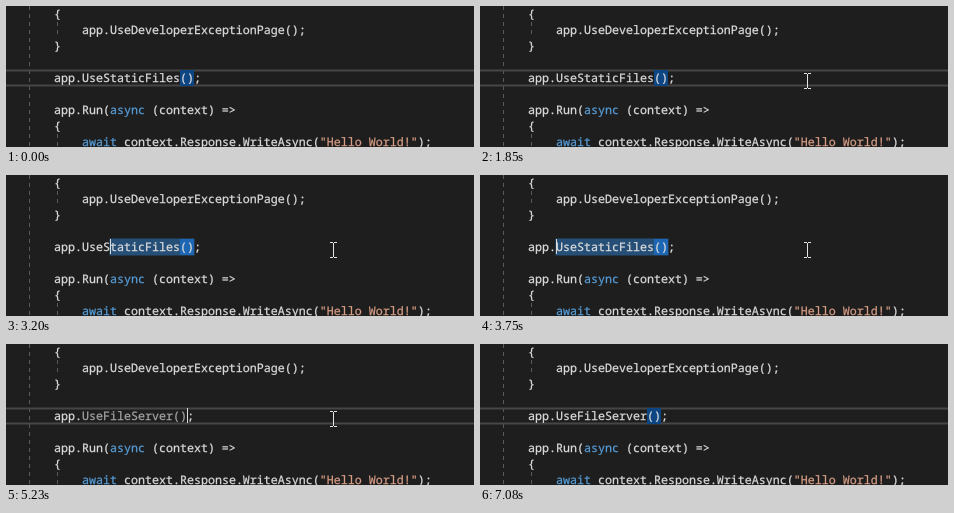
An HTML page that plays this animation: 468 px wide and 141 px high, repeating every 7.16 s.

```html
<!DOCTYPE html>
<html lang="en">
<head>
<meta charset="utf-8">
<title>Editor</title>
<style>
  html, body { margin: 0; width: 100%; height: 100%; overflow: hidden; background: #1e1e1e; }
  svg { display: block; width: 468px; height: 141px; }
  text {
    font: 11.6667px "Noto Sans Mono", "DejaVu Sans Mono", monospace;
    color: #dcdcdc; white-space: pre; text-rendering: geometricPrecision;
  }
  text, tspan { fill: currentColor; stroke: currentColor; stroke-width: .25px; }
  .keyword { color: #569cd6; }
  .string { color: #d69d85; }
  .guide { stroke: #5a5a5a; stroke-dasharray: 4 4; }
  .mark { fill: #0e4583; }
  #line { fill: #464646; }
  #selection { fill: #39f; stroke: #39f; opacity: .4; }
  #caret { fill: #dcdcdc; }
  #mouse { fill: none; stroke: #e4e4e4; }
</style>
</head>
<body>
<svg viewBox="0 0 468 141">
  <path class="guide" d="M23.5 0V141M51.5 16V32M51.5 128V141"/>
  <path id="line" d="M0 63.5h468v2H0zM0 78.5h468v2H0z"/>
  <rect id="braces" class="mark" y="64" width="14" height="16"/>
  <rect id="reference" class="mark" x="75.5" y="63.5" width="99" height="17"/>
  <rect id="selection" y="64" height="16"/>

  <text x="48" y="12">{</text>
  <text x="76" y="28">app.UseDeveloperExceptionPage();</text>
  <text x="48" y="44">}</text>
  <text x="48" y="76">app.<tspan id="call"></tspan>;</text>
  <text x="48" y="108">app.Run(<tspan class="keyword">async</tspan> (context) =&gt;</text>
  <text x="48" y="124">{</text>
  <text x="76" y="140"><tspan class="keyword">await</tspan> context.Response.WriteAsync(<tspan class="string">"Hello World!"</tspan>);</text>

  <rect id="caret" y="64" width="1" height="15"/>
  <path id="mouse" d="M-3 -7.5H0M1 -7.5H4M.5 -7V7M-3 7.5H0M1 7.5H4"/>
</svg>
<script>
const LOOP = 7160, CHAR = 7, CALL_X = 76, CALL_END = 188;
const el = id => document.getElementById(id);
const show = (id, on) => el(id).setAttribute("visibility", on ? "visible" : "hidden");
const within = (t, from, to) => t >= from && t < to;

// Moments at which the selection grows by one character to the left.
const growTimes = [2020, 2090, 2260, 2330, 2500, 2580, 2650, 2800, 2880,
  3050, 3130, 3200, 3350, 3430, 3580, 3750, 3900];
const caretOn = [[770, 1300], [1620, 1850], [2020, 4530], [5000, 5540], [5690, 6170], [6620, 7080]];

const ease = u => u * u * (3 - 2 * u);
const mix = (a, b, u) => a + (b - a) * u;
const stepped = (t, from, to, count) =>
  Math.floor((t - from) / (to - from) * (count - 1) + 0.02) / (count - 1);

function mouseAt(t) {
  if (t < 70 || t >= 6470) return null;
  if (t < 770) {
    const u = ease(stepped(t, 70, 770, 10));
    return [Math.round(mix(418, 185, u)), Math.round(mix(136, 82, u))];
  }
  if (t < 920) return [185, 82];
  if (t < 1000) return [215, 79];
  if (t < 1070) return [274, 70];
  if (t < 1150) return [316, 72];
  if (t < 6090) return [327, 75];
  const u = stepped(t, 6090, 6470, 6) + 0.2;
  return [Math.round(mix(327, 350, u)), Math.round(mix(75, 144, u * u))];
}

function caretAt(t) {
  if (t < 1300 || t >= 5230) return 181;
  if (t >= 4360) return CALL_X;
  return CALL_END - CHAR * growTimes.filter(g => g <= t).length;
}

function render(t) {
  const pasted = t >= 5230, selecting = within(t, 2020, 5230);
  const caret = caretAt(t), mouse = mouseAt(t), call = el("call");

  call.textContent = pasted ? "UseFileServer()" : "UseStaticFiles()";
  call.style.color = within(t, 5230, 5310) ? "#a4a4a4" : "";

  show("line", !selecting);
  show("reference", within(t, 4830, 5230));
  show("braces", t < 1300 || within(t, 1850, 3980) || t >= 5310);
  el("braces").setAttribute("x", pasted ? 167 : 174);

  show("selection", selecting);
  el("selection").setAttribute("x", caret);
  el("selection").setAttribute("width", Math.max(0, CALL_END - caret));

  show("caret", caretOn.some(([from, to]) => within(t, from, to)));
  el("caret").setAttribute("x", caret);

  show("mouse", mouse);
  if (mouse) el("mouse").setAttribute("transform", `translate(${mouse})`);
}

const start = performance.now();
function tick() {
  render((performance.now() - start) % LOOP);
  requestAnimationFrame(tick);
}
tick();
</script>
</body>
</html>
```
